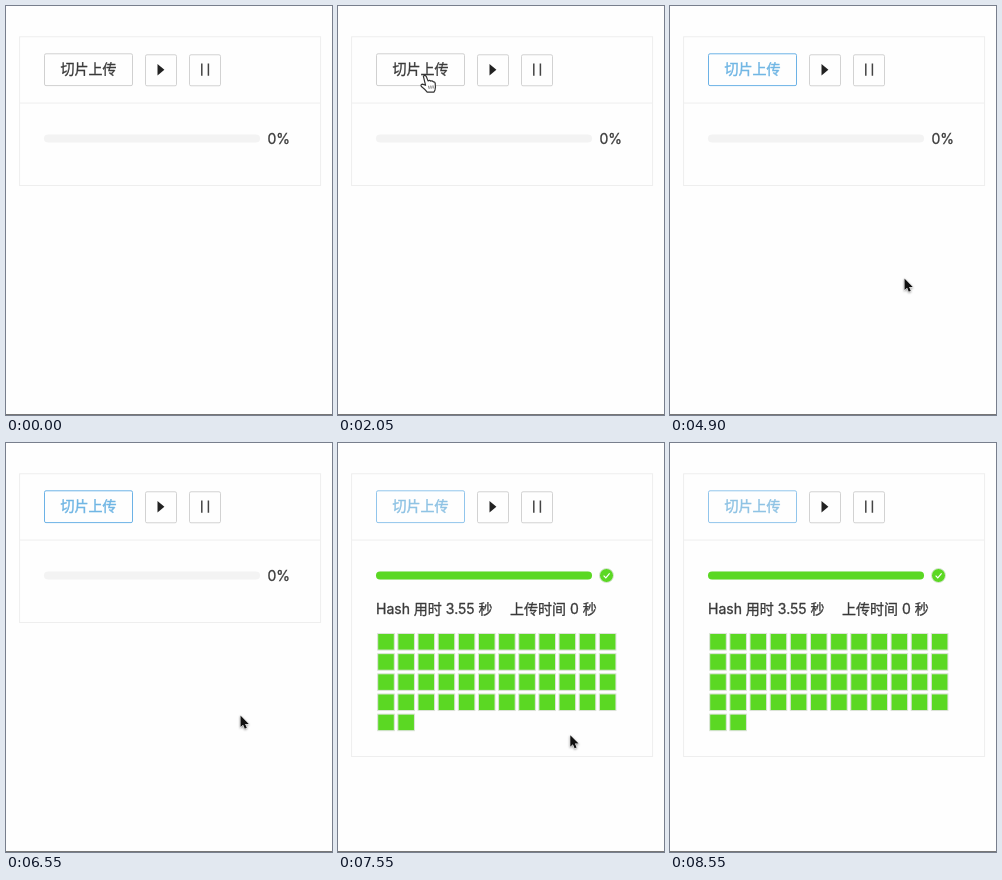
Animation, 326 px wide and 409 px high, one loop 8.6 s. Source, as an HTML page:

```html
<!DOCTYPE html>
<html lang="zh-CN">
<head>
<meta charset="utf-8">
<title>切片上传</title>
<style>
  html, body { margin: 0; width: 100%; height: 100%; overflow: hidden; background: #fefefe; }
  svg { display: block; width: 326px; height: 409px; }
  text {
    font: 14px Inter, "Noto Sans CJK SC", "Noto Sans CJK", sans-serif; white-space: pre;
    color: #3a3a3a; fill: currentColor; stroke: currentColor; stroke-width: .3px;
  }
  .box { fill: #fefefe; stroke: #d2d2d2; }
  .line { fill: none; stroke: #eee; }
  .green { fill: #5bd823; }
</style>
</head>
<body>
<svg viewBox="0 0 326 409">
  <rect id="card" class="line" x="13.6" y="30.8" width="301" height="148.7"/>
  <path class="line" d="M13.6 97H314.6"/>

  <rect id="btn" class="box" x="38.5" y="47.8" width="88" height="31.8" rx="1.5"/>
  <text id="label" x="54.5" y="68">切片上传</text>
  <rect class="box" x="139.5" y="48.8" width="31" height="31" rx="1.5"/>
  <path d="M151.5 58L158.4 63.8L151.5 69.6Z" fill="#222"/>
  <rect class="box" x="183.5" y="48.8" width="31" height="31" rx="1.5"/>
  <path d="M195.8 57.5V69.8M202.4 57.5V69.8" stroke="#444" stroke-width="1.5"/>

  <rect x="38" y="128.5" width="216" height="8" rx="4" fill="#f3f3f3"/>
  <rect id="bar" class="green" x="38" y="128.5" width="0" height="8" rx="4"/>
  <text id="percent" x="261.5" y="137.6">0%</text>

  <g id="result">
    <circle class="green" cx="268.5" cy="132.5" r="7" stroke="#dfe6dc"/>
    <path d="M265.6 132.6L267.8 134.8L271.6 130.4" fill="none" stroke="#fff" stroke-width="1.2"/>
    <text x="38" y="170.8">Hash 用时 3.55 秒</text>
    <text x="172" y="170.8">上传时间 0 秒</text>
    <g id="cubes"></g>
  </g>

  <g id="cursor">
    <path id="arrow" d="M0 0V11.6L2.6 9.2L4.3 13.2L6.3 12.3L4.6 8.4H8.3Z"
      fill="#111" stroke="#fff" paint-order="stroke"
      style="filter:drop-shadow(0 1px 1px #0006)"/>
    <g id="hand" fill="#fff" stroke="#333" stroke-width="1.2" stroke-linejoin="round">
      <path d="M-1.6 1Q-.2 -.8 1.2 1L3 5.6Q4.6 4.4 5.8 5.8Q7.2 5 8.4 6.6Q10 6.2 10.2 8.4Q10.8 12 10 14.6L9 16.8H2.2Q0 14 -3.6 11.2Q-4.8 9.2 -2.6 8.8L.6 10Z"/>
      <path d="M3.6 10.5L4.2 13.5M5.8 10.3L6.2 13.3M8 10.1L8.2 13.1" stroke-width=".7"/>
    </g>
  </g>
  <path d="M0 408.5H326" stroke="#777"/>
</svg>
<script>
const LOOP = 8600, STEP = 50, DONE = 6700;
const $ = id => document.getElementById(id);
const show = (id, on) => $(id).setAttribute("visibility", on ? "visible" : "hidden");
const ramp = (t, from, to) => Math.min(1, Math.max(0, (t - from) / (to - from)));
const mix = (a, b, p) => a.map((v, i) => v + (b[i] - v) * p);

// Button states: [border, text] colours
const rest = { border: [208, 208, 208], ink: [58, 58, 58] };
const hover = { border: [160, 182, 198], ink: [92, 103, 112] };
const focus = { border: [108, 178, 230], ink: [113, 182, 228] };
const faded = { border: [145, 197, 236], ink: [143, 195, 228] };

function buttonColor(part, t) {
  let c = mix(rest[part], hover[part], ramp(t, 850, 1150) - ramp(t, 1700, 2050));
  c = mix(c, focus[part], ramp(t, 3050, 3400));
  c = mix(c, faded[part], ramp(t, DONE, DONE + 400));
  return `rgb(${c.map(Math.round)})`;
}

// Pointer moves: from time, to time, destination
const moves = [
  [50, 450, [75, 140]], [600, 1150, [87, 69.3]], [3050, 3100, [254.5, 199.5]],
  [3700, 3900, [234.5, 272.5]], [7450, 8150, [219, 410]]
];
const pointer = t => moves.reduce((pos, [from, to, dest]) => mix(pos, dest, ramp(t, from, to)), [172, 368]);

for (let i = 0; i < 50; i++) {
  const cube = document.createElementNS("http://www.w3.org/2000/svg", "rect");
  const box = {
    x: 39.7 + i % 12 * 20.15, y: 190.5 + Math.floor(i / 12) * 20.15,
    width: 16.6, height: 16.6, class: "green", stroke: "#dde3da"
  };
  for (const k in box) cube.setAttribute(k, box[k]);
  $("cubes").append(cube);
}

function draw(t) {
  const done = t > DONE;
  $("btn").style.stroke = buttonColor("border", t);
  $("label").style.color = buttonColor("ink", t);
  $("label").style.strokeWidth = `${.3 + .15 * ramp(t, 3050, 3400)}px`;

  $("card").setAttribute("height", done ? 282.7 : 148.7);
  $("bar").setAttribute("width", 216 * (1 - (1 - ramp(t, DONE, DONE + 400)) ** 3));
  show("percent", !done);
  show("result", done);

  const [x, y] = pointer(t);
  const visible = t >= 50 && t < 8150;
  const over = x < 127 && y < 80;
  $("cursor").setAttribute("transform", `translate(${x} ${y})`);
  show("arrow", visible && !over);
  show("hand", visible && over);
}

const start = performance.now();
function frame() {
  const t = (performance.now() - start) % LOOP;
  draw(Math.floor(t / STEP) * STEP);
  requestAnimationFrame(frame);
}
frame();
</script>
</body>
</html>
```
